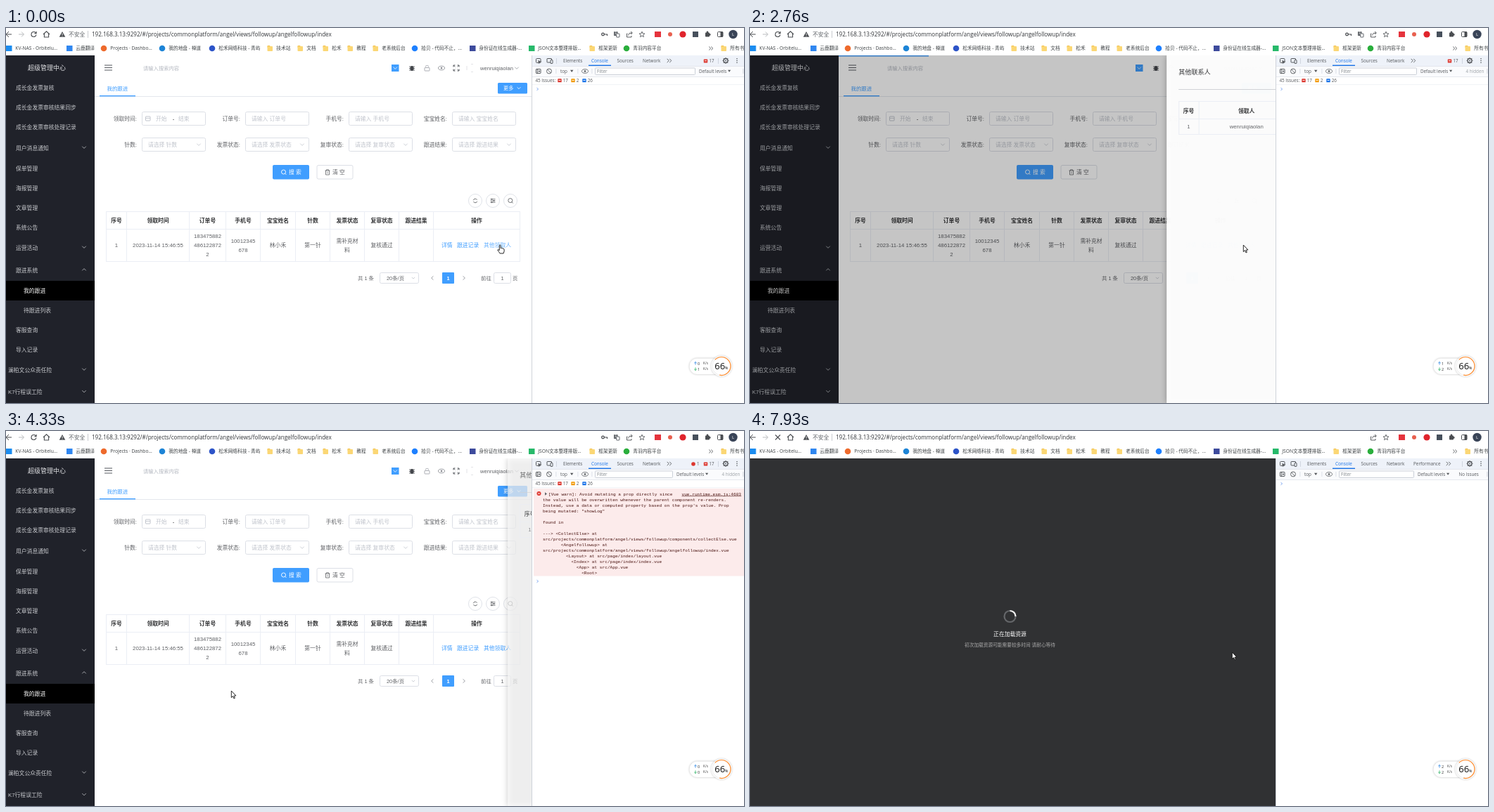
These frames come from a looping animation (1049x534 px, 8000 ms). An HTML page with a canvas:

```html
<!DOCTYPE html>
<html lang="zh-CN">
<head>
<meta charset="utf-8">
<title>我的跟进</title>
<style>
html, body { margin: 0; width: 100%; height: 100%; overflow: hidden; background: #fff; }
canvas { display: block; width: 1049px; height: 534px; }
</style>
</head>
<body>
<canvas id="stage"></canvas>
<script>
const W = 1049, H = 534, LOOP = 8000, TAU = Math.PI * 2;
const canvas = document.getElementById('stage');
const ctx = canvas.getContext('2d');
const dpr = window.devicePixelRatio || 1;
canvas.width = W * dpr;
canvas.height = H * dpr;

const CJK = '"Noto Sans CJK SC", "Noto Sans CJK JP", "Noto Sans CJK", sans-serif';
const PAGE = '"Liberation Sans", ' + CJK;
const UI = '"Open Sans", "Noto Sans", ' + CJK;
const MONO = '"Liberation Mono", monospace';
const BLUE = '#409eff', INK = '#606266', HINT = '#c0c4cc', RULE = '#ebeef5', EDGE = '#dcdfe6';
const USER = 'wenruiqiaolan';

const STEPS = [0, 970, 2600, 2760, 2880, 3020, 3170, 3290, 3440, 3590, 3730, 3850, 3970, 4090,
  4210, 4330, 4450, 4600, 4720, 4840, 4960, 5080, 5200, 5350, 5470, 5900, 6050, 6170, 6290,
  6440, 6720, 7150, 7270, 7420, 7540, 7660, 7810, 7930];
const PATH = [[0, 701, 309], [2880, 701, 309], [3020, 698, 310], [3170, 660, 314], [3290, 609, 321],
  [3440, 538, 334], [3590, 443, 346], [3730, 370, 351], [3970, 312, 349], [4090, 307, 349],
  [4210, 309, 353], [4330, 320, 370], [4450, 459, 357], [5200, 698, 334], [5470, 702, 311],
  [5900, 702, 311], [6290, 555, 340], [6720, 555, 340], [7270, 589, 333], [7660, 685, 315], [8000, 685, 315]];

const clamp = v => Math.min(1, Math.max(0, v));
const easeOut = v => 1 - Math.pow(1 - clamp(v), 3);

function text(s, x, y, size, color, align = 'left', font = PAGE, weight = 400) {
  ctx.font = `${weight} ${size}px ${font}`;
  ctx.fillStyle = color;
  ctx.textAlign = align;
  ctx.fillText(s, x, y + size * 0.37);
}
const page = (s, x, y, color = INK, align = 'left', size = 7.8) => text(s, x, y, size, color, align);
const bold = (s, x, y) => text(s, x, y, 7.8, '#303133', 'center', PAGE, 700);
const ui = (s, x, y, color = '#3c4043', size = 6.5) => text(s, x, y, size, color, 'left', UI);

function rect(x, y, w, h, color) {
  ctx.fillStyle = color;
  ctx.fillRect(x, y, w, h);
}
function box(x, y, w, h, r, fill, stroke) {
  ctx.beginPath();
  const o = stroke ? 0.5 : 0;
  ctx.roundRect(x + o, y + o, w - 2 * o, h - 2 * o, r);
  if (fill) { ctx.fillStyle = fill; ctx.fill(); }
  if (stroke) { ctx.strokeStyle = stroke; ctx.lineWidth = 1; ctx.stroke(); }
}
function line(color, width, ...p) {
  ctx.beginPath();
  for (let i = 0; i < p.length; i += 2) ctx.lineTo(p[i], p[i + 1]);
  ctx.strokeStyle = color;
  ctx.lineWidth = width;
  ctx.stroke();
}
function poly(color, ...p) {
  ctx.beginPath();
  for (let i = 0; i < p.length; i += 2) ctx.lineTo(p[i], p[i + 1]);
  ctx.closePath();
  ctx.fillStyle = color;
  ctx.fill();
}
function ring(x, y, r, color, width = 0.9, from = 0, to = TAU) {
  ctx.beginPath();
  ctx.arc(x, y, r, from, to);
  ctx.strokeStyle = color;
  ctx.lineWidth = width;
  ctx.stroke();
}
function disc(x, y, r, color) {
  ctx.beginPath();
  ctx.arc(x, y, r, 0, TAU);
  ctx.fillStyle = color;
  ctx.fill();
}
const chevron = (x, y, color, d = 1, w = 2.7) => line(color, 0.8, x - w, y - d * w / 2, x, y + d * w / 2, x + w, y - d * w / 2);
const angle = (x, y, d, color, w = 1) => line(color, w, x - d, y - 2.6, x + d, y, x - d, y + 2.6);
const lens = (x, y, color, r = 3) => { ring(x, y, r, color); line(color, 0.9, x + r * 0.7, y + r * 0.7, x + r * 1.3, y + r * 1.3); };
function eye(x, y, color) {
  ctx.beginPath();
  ctx.ellipse(x, y, 4.5, 2.8, 0, 0, TAU);
  ctx.strokeStyle = color;
  ctx.lineWidth = 0.8;
  ctx.stroke();
  disc(x, y, 1.3, color);
}
function folder(x) {
  box(x - 3.5, 25, 4, 3, 0.8, '#f0c04c');
  box(x - 3.5, 26, 7.5, 7, 0.8, '#fbd775');
}

function drawBrowser(q) {
  const dark = '#4a4d51', busy = q >= 7150;
  rect(0, 0, W, 39, '#fff');
  line(dark, 1, 8, 9, 0, 9);
  line(dark, 1, 4, 5, 0, 9, 4, 13);
  line('#b8babd', 1, 18, 9, 25, 9);
  line('#b8babd', 1, 22, 5.5, 25.5, 9, 22, 12.5);
  if (busy) {
    line(dark, 1.1, 36, 5.5, 43, 12.5);
    line(dark, 1.1, 43, 5.5, 36, 12.5);
  } else {
    ring(39.5, 9, 3.5, dark, 1.1, 0.2, TAU - 0.9);
    poly(dark, 43.6, 4.5, 43.6, 8.3, 39.8, 8.3);
  }
  line(dark, 1.1, 53, 9, 57.5, 4.8, 62, 9);
  line(dark, 1.1, 54.4, 8, 54.4, 13, 60.6, 13, 60.6, 8);
  poly(dark, 80, 5, 84.3, 12.7, 75.7, 12.7);
  rect(79.6, 7.5, 0.9, 2.6, '#fff');
  rect(79.6, 10.8, 0.9, 0.9, '#fff');
  ui('不安全', 89, 9, '#5f6368', 7.8);
  rect(116, 4, 1, 10, '#c9ccd0');
  ui('192.168.3.13:9292/#/projects/commonplatform/angel/views/followup/angelfollowup/index', 122, 9, '#33363a', 8.07);

  if (!busy) {
    ring(848.5, 9, 1.8, dark, 1.3);
    line(dark, 1.2, 850, 9, 854.5, 9, 854.5, 11);
    box(864, 5, 5.5, 6, 0.6, '#5f6368');
    box(867, 7.5, 5.5, 6, 0.6, '#fff', '#5f6368');
    text('文', 866.7, 8, 4, '#fff', 'center');
  }
  line(dark, 0.9, 883.5, 8, 882.5, 8, 882.5, 13, 889, 13, 889, 11);
  line(dark, 0.9, 884.5, 10.5, 886, 7.5, 890, 7);
  line(dark, 0.9, 888, 5, 890.3, 7, 888, 9);
  ctx.beginPath();
  for (let i = 0; i < 10; i++) {
    const r = i % 2 ? 1.8 : 4.2, a = i * Math.PI / 5 - Math.PI / 2;
    ctx.lineTo(904 + r * Math.cos(a), 9.3 + r * Math.sin(a));
  }
  ctx.closePath();
  ctx.strokeStyle = dark;
  ctx.lineWidth = 0.8;
  ctx.stroke();
  rect(922, 5, 9, 8, '#e5343d');
  disc(944, 9, 3, '#e8604f');
  disc(962, 9, 4.6, '#e0242c');
  rect(976, 5, 8, 8, '#47505c');
  box(994, 6.5, 6, 6, 0.8, dark);
  disc(997, 6, 1.4, dark);
  disc(1000.2, 9.4, 1.4, dark);
  box(1011, 5, 8.5, 8, 1, null, dark);
  rect(1015.5, 5.5, 3.5, 7, dark);
  disc(1033.5, 9, 6.2, '#394457');
  text('L', 1033.5, 9, 6, '#fff', 'center', UI);

  const marks = [
    [4, 's', '#1b8cf0', 'KV-NAS - Orbitelu...'], [90, 's', '#2f86f0', '云鹿翻译'],
    [139, 'c', '#ee6a2c', 'Projects · Dashbo...'], [222, 'c', '#1d84d6', '我的地盘 - 禅道'],
    [293, 'c', '#2d54c8', '松禾网络科技 - 青屿'], [375, 'f', 0, '技术站'], [418, 'f', 0, '文档'],
    [454, 'f', 0, '松禾'], [489, 'f', 0, '教程'], [525, 'f', 0, '老系统后台'],
    [581, 'c', '#1e80ff', '拾贝 - 代码不止，...'], [663, 's', '#3d4a9c', '身份证在线生成器-...'],
    [747, 's', '#27b96a', 'JSON文本整理排版...'], [833, 'f', 0, '框架更新'],
    [882, 'c', '#2aae3c', '青羽内容平台'], [1020, 'f', 0, '所有书签']];
  for (const [x, kind, color, label] of marks) {
    if (kind === 'f') folder(x);
    else if (kind === 's') rect(x - 4, 25, 8.5, 8, color);
    else disc(x, 29, 4.3, color);
    ui(label, x + 9.3, 29, '#3c4043', 6.7);
  }
  angle(1000.5, 29, 1, dark, 0.8);
  angle(1003.5, 29, 1, dark, 0.8);
}

function drawSidebar() {
  const soft = '#c6c8cc';
  rect(0, 39, 126, 495, '#20222a');
  rect(0, 360, 126, 28, '#000');
  page('超级管理中心', 31, 57, '#dfe0e3', 'left', 9);
  const items = [['成长金发票复核', 85], ['成长金发票审核结果同步', 113], ['成长金发票审核处理记录', 141],
    ['用户消息通知', 171, 1], ['保单管理', 200], ['海报管理', 228], ['文章管理', 256], ['系统公告', 284],
    ['运营活动', 313, 1], ['跟进系统', 345, -1], ['客服查询', 430], ['导入记录', 458]];
  for (const [label, y, arrow] of items) {
    page(label, 14, y, soft);
    if (arrow) chevron(111, y - 1, soft, arrow);
  }
  page('我的跟进', 25, 374, '#fff');
  page('待跟进列表', 25, 402, soft);
  [['澜柏文公众责任险', 487], ['K7行程误工险', 518.5]].forEach(([label, y]) => {
    page(label, 3, y, soft);
    chevron(111, y - 1, soft);
  });
}

function drawHeader() {
  const g = '#55585e';
  for (const y of [53, 56.5, 60]) line(g, 1, 140, y, 151, y);
  page('请输入搜索内容', 195, 57, '#b4b8c0', 'left', 7.3);
  rect(548, 52, 10.5, 10, BLUE);
  chevron(553.2, 57, '#fff');
  ctx.beginPath();
  ctx.ellipse(577, 57.5, 2.6, 3.6, 0, 0, TAU);
  ctx.fillStyle = '#44474c';
  ctx.fill();
  for (const d of [-2.5, 0, 2.5]) line('#44474c', 0.8, 573, 57.5 + d, 581, 57.5 + d);
  box(594.5, 56, 8, 5.5, 0.5, null, '#aaadb3');
  ring(598.5, 55.5, 2.2, '#aaadb3', 0.9, Math.PI, TAU);
  eye(619, 57, '#85888e');
  for (const [sx, sy] of [[-1, -1], [1, -1], [-1, 1], [1, 1]]) {
    line(g, 1, 640 + sx * 1.5, 57 + sy * 4, 640 + sx * 4, 57 + sy * 4, 640 + sx * 4, 57 + sy * 1.5);
    line(g, 0.8, 640 + sx * 4, 57 + sy * 4, 640 + sx * 1.5, 57 + sy * 1.5);
  }
  line('#e2e3e6', 1, 655, 54, 655, 60);
  line('#e2e3e6', 1, 661, 51.5, 664, 51.5);
  line('#e2e3e6', 1, 661, 62.5, 664, 62.5);
  page(USER, 674, 57, INK, 'left', 7.6);
  chevron(726, 57, '#909399');

  rect(126, 97, 621, 1, '#e4e7ed');
  page('我的跟进', 143.5, 86, BLUE, 'left', 7.4);
  rect(133, 96, 51, 1.4, BLUE);
  box(699, 78, 42, 15.5, 1.5, BLUE);
  page('更多', 707, 85.5, '#fff', 'left', 7.2);
  chevron(729, 85.5, '#fff', 1, 2.4);
}

function drawForm() {
  const rows = [
    [129, ['领取时间', '订单号', '手机号', '宝宝姓名'], '请输入 '],
    [166, ['针数', '发票状态', '复审状态', '跟进结果'], '请选择 ']];
  rows.forEach(([y, labels, verb], row) => labels.forEach((label, i) => {
    const x = 193 + i * 147;
    page(label + ':', x - 7, y, INK, 'right');
    box(x, y - 10, 91, 20, 2, '#fff', EDGE);
    if (row || i) page(verb + label, x + 9, y, HINT);
    if (row) chevron(x + 81, y, HINT);
  }));
  box(198, 125.5, 7.5, 7, 0.5, null, HINT);
  line(HINT, 0.8, 198, 128.5, 205, 128.5);
  page('开始', 213, 129, HINT);
  page('-', 238, 129, '#303133', 'center');
  page('结束', 245, 129, HINT);

  box(379, 195, 52, 20.5, 2, BLUE);
  lens(394.5, 205, '#fff');
  page('搜 索', 402, 205.5, '#fff');
  box(441.5, 195, 52, 20.5, 2, '#fff', EDGE);
  line(INK, 0.8, 453.5, 203, 460.5, 203);
  line(INK, 0.8, 455.5, 203, 455.5, 201.8, 458.5, 201.8, 458.5, 203);
  line(INK, 0.8, 454.5, 203, 454.5, 209, 459.5, 209, 459.5, 203);
  line(INK, 0.7, 457, 204.5, 457, 207.5);
  page('清 空', 464, 205.5);

  for (const x of [667, 692, 717]) ring(x, 246, 9.5, EDGE, 0.9);
  ring(667, 246, 2.8, INK, 0.9, 0.3, 2.7);
  ring(667, 246, 2.8, INK, 0.9, 3.4, 5.8);
  [-2.3, 0, 2.3].forEach((d, i) => {
    line(INK, 0.8, 688.5, 246 + d, 695.5, 246 + d);
    disc(i === 1 ? 693.5 : 690.5, 246 + d, 1, INK);
  });
  lens(716.8, 245.6, INK);
}

function drawTable(hover) {
  const xs = [142, 171, 260, 312, 361, 411, 460, 509, 558, 607, 730];
  const heads = ['序号', '领取时间', '订单号', '手机号', '宝宝姓名', '针数', '发票状态', '复审状态', '跟进结果', '操作'];
  const cells = [['1'], ['2023-11-14 15:46:55'], ['183475882', '486122872', '2'], ['10012345', '678'],
    ['林小禾'], ['第一针'], ['需补充材', '料'], ['复核通过']];
  for (const x of xs) rect(x, 261, 1, 72, RULE);
  for (const y of [261, 286, 332]) rect(142, y, 589, 1, RULE);
  const mid = i => (xs[i] + xs[i + 1]) / 2 + 0.5;
  heads.forEach((s, i) => bold(s, mid(i), 274));
  cells.forEach((rows, i) => rows.forEach((s, k) =>
    page(s, mid(i), 309.5 + (k - (rows.length - 1) / 2) * 13, INK, 'center')));
  page('详情', 619, 309.5, BLUE);
  page('跟进记录', 641, 309.5, BLUE);
  page('其他领取人', 679, 309.5, hover ? '#66b1ff' : BLUE);

  page('共 1 条', 500, 356, INK, 'left', 7.4);
  box(531, 348, 56, 16, 2, '#fff', EDGE);
  page('20条/页', 541, 356, INK, 'left', 7.4);
  chevron(579, 356, HINT, 1, 2.2);
  angle(606, 356, -1.4, '#909399', 0.9);
  box(620, 348, 17, 16, 1, BLUE);
  text('1', 628.5, 356, 7.4, '#fff', 'center', PAGE, 700);
  angle(651, 356, 1.4, '#909399', 0.9);
  page('前往', 675, 356, INK, 'left', 7.4);
  box(693, 348, 25, 16, 2, '#fff', EDGE);
  page('1', 705.5, 356, INK, 'center', 7.4);
  page('页', 720, 356, INK, 'left', 7.4);
}

function drawDrawer(x, alpha) {
  ctx.save();
  ctx.globalAlpha = alpha;
  ctx.shadowColor = 'rgba(0,0,0,.3)';
  ctx.shadowBlur = 8 * dpr;
  rect(x, 39, 345, 495, '#fff');
  ctx.shadowColor = 'transparent';
  text('其他联系人', x + 17, 63, 9.1, '#303133', 'left', PAGE, 500);
  box(x + 278.5, 56, 39.5, 20, 2, '#fff', EDGE);
  page('关闭', x + 298, 66, INK, 'center');
  rect(x + 17, 87, 301, 1, '#cfd1d5');
  const xs = [17, 45.5, 181.5, 317.5];
  for (const c of xs) rect(x + c, 105, 1, 47, RULE);
  for (const y of [104, 129, 151]) rect(x + 17, y, 301, 1, RULE);
  ['序号', '领取人', '针数'].forEach((s, i) => bold(s, x + (xs[i] + xs[i + 1]) / 2, 118));
  ['1', USER, '第一针'].forEach((s, i) => page(s, x + (xs[i] + xs[i + 1]) / 2, 140.5, INK, 'center'));
  ctx.restore();
}

function drawLoading(q) {
  rect(0, 39, 747, 495, '#303133');
  const a = (q - 7930) / 1000 * TAU - Math.PI / 2;
  ring(369.5, 264, 8, '#65676a', 2.2);
  ring(369.5, 264, 8, '#f2f2f2', 2.2, a, a + Math.PI / 2);
  page('正在加载资源', 369.5, 289.5, '#fff', 'center');
  page('初次加载资源可能需要较多时间 请耐心等待', 369.5, 305, '#ababab', 'center', 6.7);
}

function drawPage(q) {
  ctx.save();
  ctx.beginPath();
  ctx.rect(0, 39, 747, 495);
  ctx.clip();
  rect(0, 39, 747, 495, '#fff');
  if (q >= 7420) {
    drawLoading(q);
  } else {
    drawHeader();
    drawForm();
    drawTable(q < 2760 || (q >= 5470 && q < 6440));
    drawSidebar();
    if (q === 2760 || q === 2880) rect(126, 39, 128, 1.5, BLUE);
    const enter = easeOut((q - 2705) / 300), raw = (q - 4169) / 300, leave = easeOut(raw);
    const shown = enter - leave;
    if (shown > 0.01) {
      rect(0, 39, 747, 495, `rgba(0,0,0,${0.5 * enter * clamp(1 - raw * 2)})`);
      drawDrawer(747 - 340 * shown, leave ? 1 - 0.35 * leave : enter < 1 ? 0.97 : 1);
    }
  }
  ctx.restore();
}

function badge(x, y, color) {
  box(x - 2.7, y - 2.7, 5.4, 5, 0.6, color);
  rect(x - 1.5, y - 1, 3, 0.9, '#fff');
}

function drawError() {
  rect(750, 82, 299, 124.5, '#fcebeb');
  const ink = '#4b1512', size = 6.14;
  const mono = (s, x, y) => text(s, x, y, size, ink, 'left', MONO);
  disc(757.5, 89, 3, '#dc362e');
  line('#fff', 0.8, 756.3, 87.8, 758.7, 90.2);
  line('#fff', 0.8, 758.7, 87.8, 756.3, 90.2);
  poly('#5f6368', 766, 87.3, 769, 89.5, 766, 91.7);
  mono('[Vue warn]: Avoid mutating a prop directly since', 771, 89.5);
  mono('vue.runtime.esm.js:4603', 960.5, 89.5);
  rect(960.5, 92.5, 84.7, 0.6, ink);
  const pad = n => ' '.repeat(n);
  ['the value will be overwritten whenever the parent component re-renders.',
    "Instead, use a data or computed property based on the prop's value. Prop",
    'being mutated: "showLog"', '', 'found in', '', '---> <CollectElse> at',
    'src/projects/commonplatform/angel/views/followup/components/collectElse.vue',
    pad(7) + '<Angelfollowup> at',
    'src/projects/commonplatform/angel/views/followup/angelfollowup/index.vue',
    pad(9) + '<Layout> at src/page/index/layout.vue',
    pad(11) + '<Index> at src/page/index/index.vue',
    pad(13) + '<App> at src/App.vue',
    pad(15) + '<Root>'].forEach((s, i) => mono(s, 763, 97.5 + i * 8.04));
}

function drawDevtools(q) {
  const g = '#55585c', failed = q >= 4210 && q < 7150, clean = q >= 7150, narrow = q >= 2760;
  rect(747, 39, 302, 495, '#fff');
  rect(747, 39, 302, 15, '#eef2f9');
  rect(747, 54, 302, 15, '#fafbfd');
  rect(747, 54, 302, 0.6, '#d5dae3');
  rect(747, 69, 302, 0.6, '#d5dae3');
  rect(747, 39, 1, 495, '#cfd3da');
  box(753, 43, 7.5, 7, 1, null, g);
  poly(g, 756, 46, 761.5, 48, 758.6, 48.8, 757.7, 51.5);
  box(768.5, 43, 7.5, 6.5, 0.5, null, g);
  box(773.5, 45, 4, 6, 0.5, '#eef2f9', g);
  rect(782, 43, 0.8, 8, '#c9cfd9');
  ui('Elements', 792, 47, g, 6.35);
  ui('Console', 832, 47, '#1a73e8', 6.35);
  rect(828, 52.6, 32, 1.4, '#1a73e8');
  ui('Sources', 868.5, 47, g, 6.35);
  ui('Network', 905, 47, g, 6.35);
  if (clean) ui('Performance', 943, 47, g, 6.35);
  const more = clean ? 991 : 941;
  angle(more, 46.5, 1.3, g, 0.9);
  angle(more + 3.5, 46.5, 1.3, g, 0.9);
  if (failed) {
    disc(977, 47, 2.8, '#dc362e');
    ui('1', 982, 47, g, 6.2);
  }
  if (!clean) {
    badge(994.5, 47.3, '#dc362e');
    ui('17', 999.5, 47, g, 6.2);
  }
  rect(1012, 43, 0.8, 8, '#c9cfd9');
  ring(1023, 46.5, 3, g, 1.4);
  for (let i = 0; i < 8; i++) disc(1023 + 4 * Math.cos(i * TAU / 8), 46.5 + 4 * Math.sin(i * TAU / 8), 0.6, g);
  disc(1023, 46.5, 0.9, g);
  for (const y of [43.8, 46.5, 49.2]) disc(1039, y, 0.8, g);

  box(753, 58, 7.5, 7, 0.5, null, g);
  rect(755, 58, 0.9, 7, g);
  poly(g, 757, 60, 759.4, 61.5, 757, 63);
  ring(772, 61.5, 3.5, g);
  line(g, 0.9, 769.5, 59, 774.5, 64);
  for (const x of [781.5, 812.5, 832.5]) rect(x, 58, 0.8, 7, '#d5dae3');
  ui('top', 788, 61.5, g, 6.35);
  poly(g, 802, 59.8, 806.4, 59.8, 804.2, 63);
  eye(823, 61.5, g);
  const end = clean ? 944 : narrow ? 948 : 980;
  box(837, 56.5, end - 837, 10.5, 1, '#fff', '#cbd0d8');
  ui('Filter', 840, 62, '#80868b', 6.2);
  ui('Default levels', end + 5, 61.5, g, 6.3);
  poly(g, end + 46, 59.8, end + 50.2, 59.8, end + 48.1, 62.8);
  if (clean) ui('No Issues', 1007.5, 61.5, g, 6.3);
  else if (narrow) ui('4 hidden', 1017.5, 61.5, '#9aa0a6', 6.3);
  rect(1047.5, 58, 0.8, 7, '#c9cfd9');

  if (!clean) {
    ui('45 Issues:', 752.5, 75, g, 6.3);
    [[787, '#dc362e', '17'], [806, '#f29900', '2'], [822, '#1a73e8', '26']].forEach(([x, color, n]) => {
      badge(x, 75, color);
      ui(n, x + 4.7, 75, g, 6.3);
    });
    rect(748, 80.5, 301, 0.6, '#e6eaf0');
  }
  if (failed) drawError();
  const y = clean ? 75 : failed ? 214 : 87;
  line('#6f9cf0', 0.9, 754.5, y - 1.8, 756.6, y, 754.5, y + 1.8);
}

function drawMeter(q) {
  const [up, down] = q < 970 ? [0, 1] : q >= 2760 && q < 3850 ? [1, 2] : q >= 7810 ? [2, 2] : [0, 0];
  const load = q < 5900 ? 66 : q < 6720 ? 65 : q < 7810 ? 63 : 66;
  ctx.save();
  ctx.shadowColor = 'rgba(0,0,0,.28)';
  ctx.shadowBlur = 3 * dpr;
  box(971.5, 470.5, 46, 22.5, 11, '#fff');
  disc(1017, 481.5, 14.5, '#fff');
  ctx.restore();
  disc(1017, 481.5, 14.5, '#fff');
  [[up, 477.5, '#3a8ee6', -1], [down, 485.5, '#35b56a', 1]].forEach(([n, y, color, d]) => {
    line(color, 0.9, 980, y - 2, 980, y + 2);
    line(color, 0.9, 978.3, y + d * 0.4, 980, y + d * 2, 981.7, y + d * 0.4);
    text(n, 983, y, 5.6, '#333', 'left', UI);
    text('K/s', 991, y, 4.8, '#444', 'left', UI);
  });
  ring(1017, 481.5, 13, '#f0f0f0', 1.2);
  ring(1017, 481.5, 13, '#ff8a2a', 1.2, -0.75 * Math.PI, -0.75 * Math.PI + TAU * load / 100);
  text(load, 1007.3, 481.5, 13, '#111', 'left', UI);
  text('%', 1022, 484, 5.2, '#111', 'left', UI);
}

function drawCursor(q) {
  const i = PATH.findIndex((p, k) => k && p[0] > q);
  const [t0, x0, y0] = PATH[i - 1], [t1, x1, y1] = PATH[i];
  const k = (q - t0) / (t1 - t0);
  const hand = q < 2760 || (q >= 5470 && q < 6050);
  const shape = hand
    ? [0, 0.5, 1, 0, 1.9, 0.6, 1.9, 4.6, 3.4, 4.3, 4.6, 5, 6, 5.2, 6.8, 6, 6.8, 9, 5.8, 12, 0.8, 12, -0.8, 9.6, -2.6, 7, -1.8, 6.3, 0, 7.6]
    : [0, 0, 0, 9.6, 2.2, 7.6, 3.7, 11, 5.1, 10.3, 3.7, 7.1, 6.6, 7];
  ctx.save();
  ctx.translate(x0 + (x1 - x0) * k + 0.3, y0 + (y1 - y0) * k);
  poly('#fff', ...shape);
  ctx.strokeStyle = '#111';
  ctx.lineWidth = 0.9;
  ctx.lineJoin = 'round';
  ctx.stroke();
  ctx.restore();
}

function frame(now) {
  const t = now % LOOP;
  const q = STEPS.filter(s => s <= t).pop() || 0;
  ctx.setTransform(dpr, 0, 0, dpr, 0, 0);
  drawBrowser(q);
  drawPage(q);
  drawDevtools(q);
  drawMeter(q);
  drawCursor(q);
  requestAnimationFrame(frame);
}
requestAnimationFrame(frame);
</script>
</body>
</html>
```
